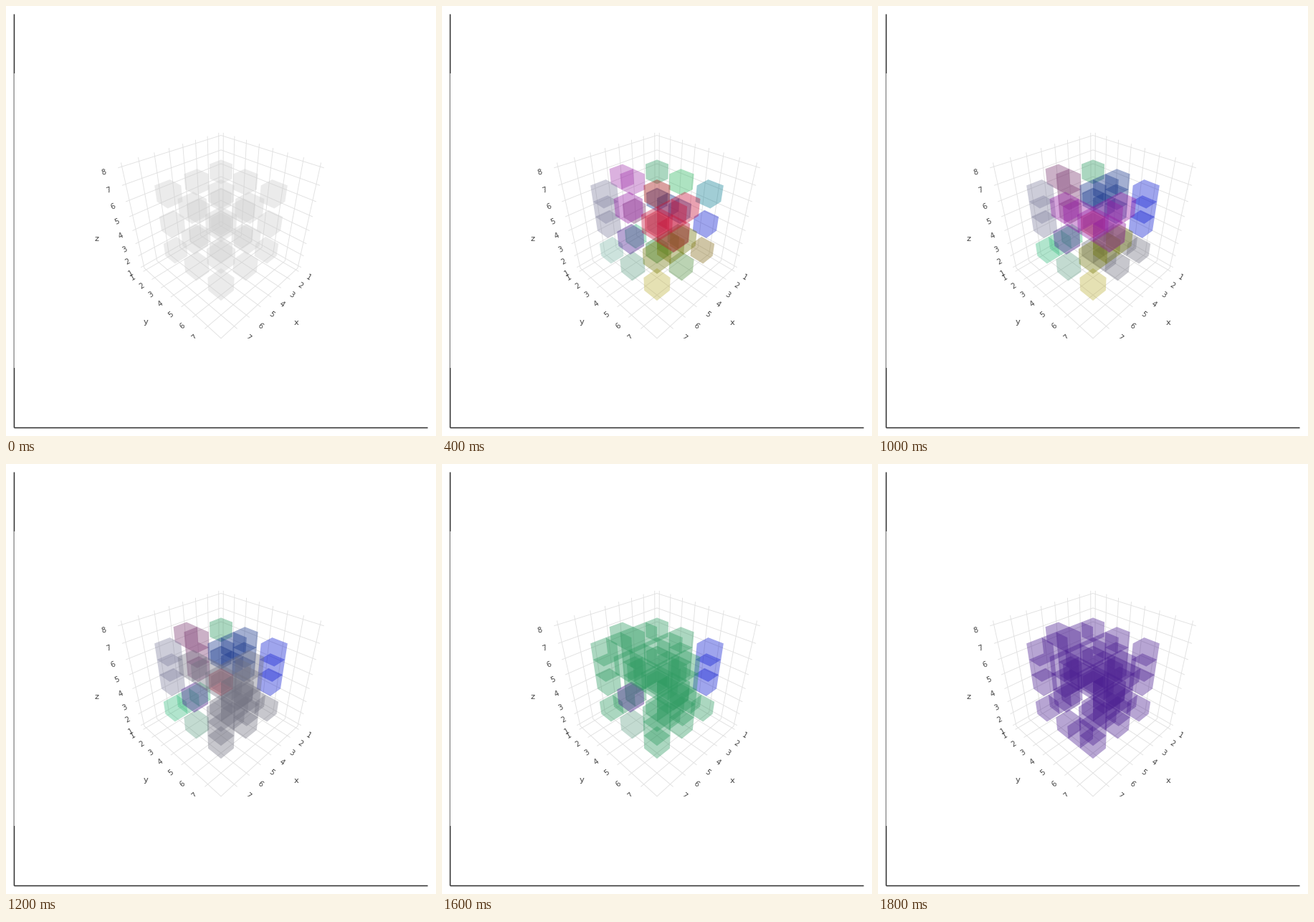
These frames come from a looping animation (600 px wide and 600 px high, 2540 ms). A matplotlib script:

```python
import numpy as np
import matplotlib.pyplot as plt
from matplotlib.animation import FuncAnimation
from matplotlib.collections import LineCollection, PolyCollection
from matplotlib.colors import to_rgba
from matplotlib.patches import Rectangle

SIZE, DPI = 600, 100
PX = 72 / DPI
FRAMES, STEP = 254, 10           # one loop: 2540 ms
RATE = 15                        # maze steps per second
MID, SPAN = 4.5, 7 * 17 / 16     # axes cover 1..8 plus a small pad
LO, HI = MID - SPAN / 2, MID + SPAN / 2
FOCAL, CENTER = 385, (300, 304)
OPACITY = 0.4
GREY = "#cdcdcd"
EDGE, LINE = 11.46, 1.56         # outer frame inset and line width

# start colour of each cell, keyed by its x, y, z index
COLORS = {
    "000": "#737382", "001": "#19378c", "002": "#2f9b62",
    "010": "#288c3c", "011": "#22468f", "012": "#32b964",
    "020": "#89701e", "021": "#111ed2", "022": "#148296",
    "100": "#3cbe82", "101": "#7d3c73", "102": "#a53caf",
    "110": "#288c3c", "111": "#d7283c", "112": "#a31212",
    "120": "#559343", "121": "#757a0f", "122": "#c8143c",
    "200": "#82bbac", "201": "#8282a0", "202": "#8282a0",
    "210": "#6ba78e", "211": "#4b1e91", "212": "#961ea5",
    "220": "#c0b443", "221": "#757a0f", "222": "#c8143c",
}

# walls in the order they open; the first cell's group passes on its colour
MERGES = """
    202>201 221>121 222>122 001>011 110>010
    101>102 000>010 011>012 100>200 010>020
    012>112 021>022 110>120 212>222
    120>121 221>220 121>122 100>101 101>111 111>011
    002>102 102>202 112>212
    211>212 011>021 220>210
    """.split()

# doors in the outer wall: cell and the offset along y
DOORS = {"102": -1, "222": 1}

# silhouette of a unit cube seen from (1, 1, 1)
RIM = np.array([(1, 0, 0), (1, 1, 0), (0, 1, 0),
                (0, 1, 1), (0, 0, 1), (1, 0, 1)])


def project(p):
    """Perspective view from (1, 1, 1) onto the stage, plus depth."""
    x, y, z = np.moveaxis((np.asarray(p, float) - MID) / SPAN, -1, 0)
    depth = 1.25 * 3 ** 0.5 - (x + y + z) / 3 ** 0.5
    right = (y - x) / 2 ** 0.5
    up = (2 * z - x - y) / 6 ** 0.5
    pts = np.stack([CENTER[0] + FOCAL * right / depth,
                    CENTER[1] - FOCAL * up / depth], -1)
    return pts, depth


def corner(cell):
    return np.array([2 + 2 * int(c) for c in cell])


def make_states():
    """One list of (voxel corner, colour) for every step."""
    states = [[(corner(c), GREY) for c in COLORS]]
    color = dict(COLORS)
    group = {c: {c} for c in COLORS}
    voxels = [(corner(c), c) for c in COLORS]
    voxels += [(corner(c) + (0, d, 0), c) for c, d in DOORS.items()]

    def snap():
        states.append([(v, color[owner]) for v, owner in voxels])

    snap()
    for merge in MERGES:
        win, lose = merge.split(">")
        voxels.append(((corner(win) + corner(lose)) // 2, win))
        tone = color[win]
        joined = group[win] | group[lose]
        for c in joined:
            group[c] = joined
            color[c] = tone
        snap()
    return states


def shade(state):
    """Outlines and colours, far to near."""
    order = sorted(state, key=lambda s: -project(s[0] + 0.5)[1])
    return ([project(v + RIM)[0] for v, _ in order],
            [to_rgba(c, OPACITY) for _, c in order])


def grid_lines():
    lines = []
    for axis in range(3):
        for along in {0, 1, 2} - {axis}:
            for t in range(1, 9):
                ends = np.full((2, 3), LO)
                ends[:, axis] = t
                ends[1, along] = HI
                lines.append(project(ends)[0])
    return lines


def label(ax, x, y, text, size, clip, angle=0):
    t = ax.text(x, y, text, size=size * PX, color="#444444", rotation=angle,
                ha="center", va="center", family="DejaVu Sans", zorder=3)
    t.set_clip_path(clip)
    t.set_clip_on(True)


def tick_labels(ax, axis, out, base, clip):
    """Numbers beside one box edge, turned along the grid lines."""
    for t in range(1, 9):
        p = np.array(base, float)
        p[axis] = t
        q = p.copy()
        q[out] += 0.1 * SPAN
        (x0, y0), (x1, y1) = project([p, q])[0]
        angle = np.degrees(np.arctan((y0 - y1) / (x1 - x0)))
        label(ax, x1, y1, str(t), 10, clip, angle)


def box(ax, x0, y0, x1, y1, color, z):
    ax.add_patch(Rectangle((x0, y0), x1 - x0, y1 - y0, fc=color, lw=0,
                           zorder=z, snap=False))


fig = plt.figure(figsize=(SIZE / DPI, SIZE / DPI), dpi=DPI, facecolor="white")
ax = fig.add_axes([0, 0, 1, 1])
ax.set(xlim=(0, SIZE), ylim=(SIZE, 0))
ax.axis("off")

# outer frame; the white plot area hides half of the left line
end, half = SIZE - EDGE, LINE / 2
box(ax, EDGE - half, EDGE, EDGE + half, end, "#333333", 0.1)
box(ax, EDGE, end - half, end, end + half, "#333333", 0.1)
box(ax, EDGE, 94, end, 505, "white", 0.2)

clip = ax.add_patch(Rectangle((20, 144.5), 560, 319, fc="none", ec="none"))
grid = LineCollection(grid_lines(), colors="#e1e1e1", linewidths=0.9 * PX,
                      zorder=1)
ax.add_collection(grid)
grid.set_clip_path(clip)

tick_labels(ax, 0, 1, (LO, HI, LO), clip)
tick_labels(ax, 1, 0, (HI, LO, LO), clip)
tick_labels(ax, 2, 0, (HI, LO, LO), clip)
for x, y, name in [(405, 442, "x"), (195, 441, "y"), (127, 325, "z")]:
    label(ax, x, y, name, 11.5, clip)

scenes = [shade(s) for s in make_states()]
cubes = PolyCollection([], linewidths=0, zorder=2)
ax.add_collection(cubes)


def draw(n):
    step = min(int((n + 0.5) * STEP * RATE / 1000), len(scenes) - 1)
    shapes, colors = scenes[step]
    cubes.set_verts(shapes)
    cubes.set_facecolor(colors)
    return [cubes]


anim = FuncAnimation(fig, draw, frames=FRAMES, interval=STEP,
                     repeat=True, repeat_delay=0)
plt.show()
```
